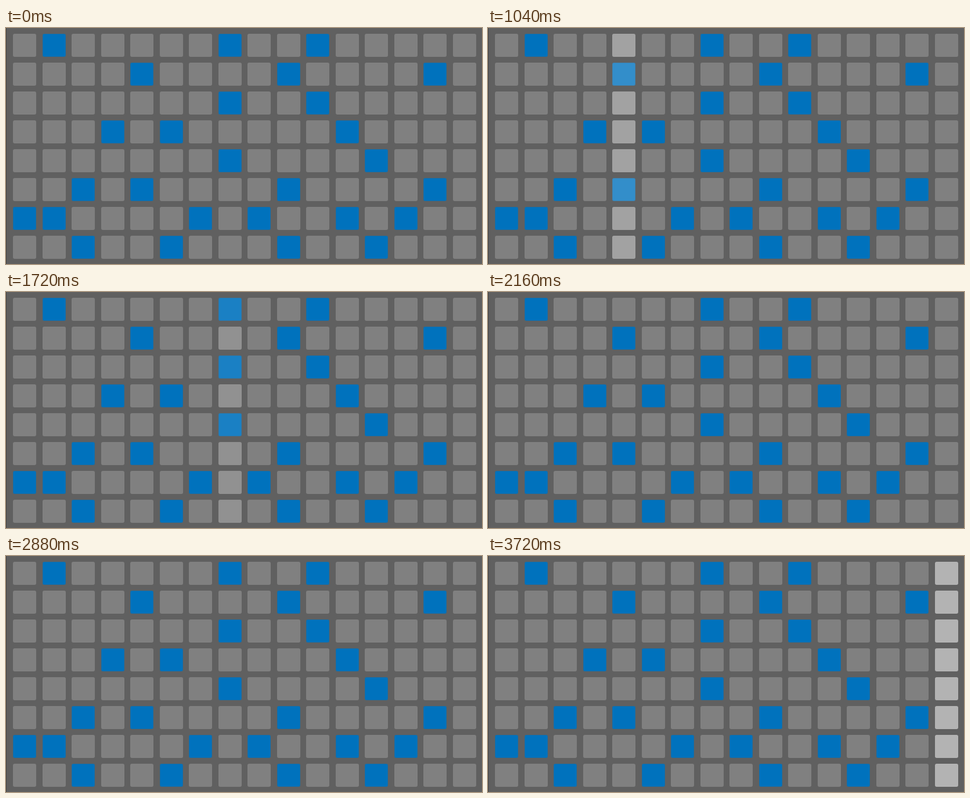
Write an HTML page with a canvas that moves like this. It is 820 px wide and 409 px high and loops after 3.84 s.

```html
<!DOCTYPE html>
<html lang="en">
<head>
<meta charset="utf-8">
<title>Step sequencer</title>
<style>
  html, body { margin: 0; width: 100%; height: 100%; overflow: hidden; background: #606060; }
  canvas { display: block; }
</style>
</head>
<body>
<canvas id="stage" width="820" height="409"></canvas>
<script>
const ctx = document.getElementById('stage').getContext('2d');

const LOOP = 3840, TICK = 40, BEAT = 240;
const COLS = 16, ROWS = 8, SIZE = 40;
const GREY = [128, 128, 128], GREY_LIT = [179, 179, 179];
const BLUE = [0, 114, 189], BLUE_LIT = [77, 156, 209];

// Active columns of each row, top to bottom.
const pattern = [
  [1, 7, 10],
  [4, 9, 14],
  [7, 10],
  [3, 5, 11],
  [7, 12],
  [2, 4, 9, 14],
  [0, 1, 6, 8, 11, 13],
  [2, 5, 9, 12]
];

const mix = (from, to, k) => `rgb(${from.map((v, i) => Math.round(v + (to[i] - v) * k))})`;

function box(x, y, size, radius, color) {
  ctx.fillStyle = color;
  ctx.beginPath();
  ctx.roundRect(x, y, size, size, radius);
  ctx.fill();
}

function drawCell(col, row, level) {
  const x = Math.round(12 + 50.5 * col), y = 10 + 50 * row;
  if (!pattern[row].includes(col)) {
    box(x, y, SIZE, 3, mix(GREY, GREY_LIT, level));
    return;
  }
  const color = mix(BLUE, BLUE_LIT, level);
  ctx.globalAlpha = 0.75;
  box(x, y, SIZE, 3, color);
  ctx.globalAlpha = 1;
  box(x + 1, y + 1, SIZE - 2, 2, color);
}

function draw(time) {
  const t = Math.floor((time % LOOP) / TICK) * TICK;
  const active = Math.floor(t / BEAT);
  // The playing column brightens over three ticks, then holds.
  const glow = Math.min((t % BEAT) / (3 * TICK), 1);

  ctx.fillStyle = '#606060';
  ctx.fillRect(0, 0, 820, 409);
  ctx.fillStyle = '#404040';
  ctx.fillRect(0, 0, 1, 409);

  for (let row = 0; row < ROWS; row++) {
    for (let col = 0; col < COLS; col++) drawCell(col, row, col === active ? glow : 0);
  }
}

const start = performance.now();
function frame() {
  draw(performance.now() - start);
  requestAnimationFrame(frame);
}
frame();
</script>
</body>
</html>
```
